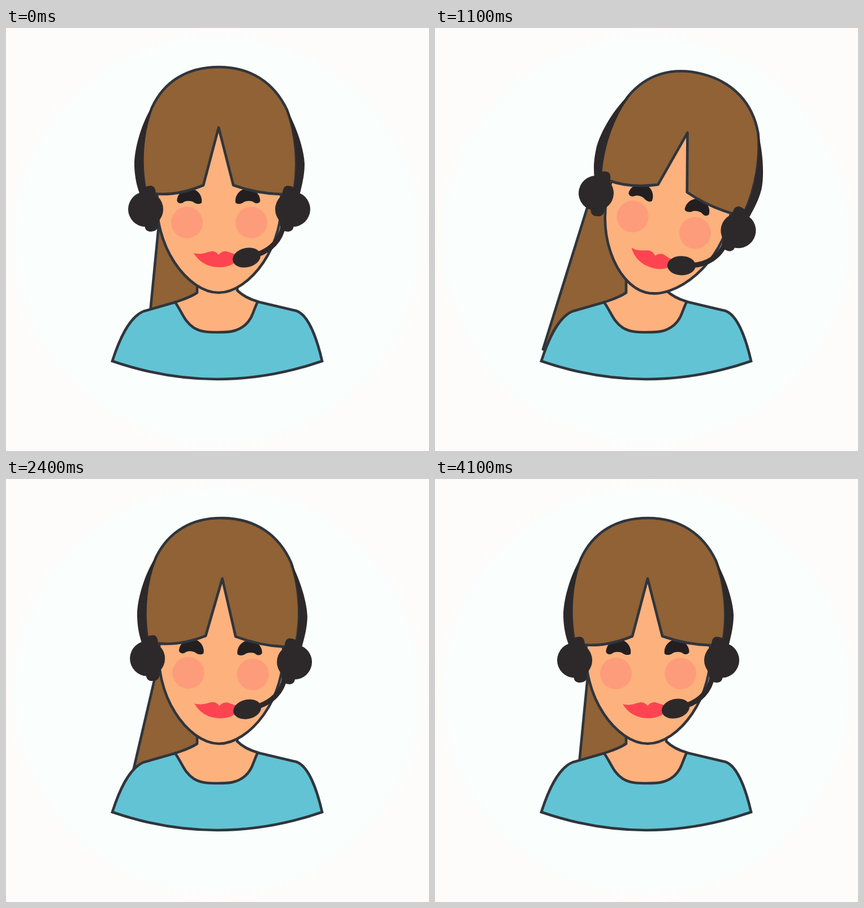
Write an HTML page that moves like this. It is 748x748 px and loops after 8 s.

```html
<!DOCTYPE html>
<html lang="en">
<head>
<meta charset="utf-8">
<title>Support agent</title>
<style>
html, body { margin: 0; width: 100%; height: 100%; overflow: hidden; background: #fefcfa; }
svg { display: block; width: 100%; height: 100%; }
.line { stroke: #30353c; stroke-width: 4.6; stroke-linejoin: round; }
.hair { fill: #906235; }
.skin { fill: #fdb17d; }
.shirt { fill: #62c3d4; stroke-linejoin: miter; }
.cheek { fill: #fd9c7a; }
.lips { fill: #fe4450; }
.brow { fill: #231f20; }
.gear { fill: #2d292a; }
.boom { fill: none; stroke: #2d292a; stroke-width: 9; }
</style>
</head>
<body>
<svg viewBox="0 0 748 748">
  <defs>
    <radialGradient id="glow">
      <stop offset=".93" stop-color="#fafefd"/>
      <stop offset="1" stop-color="#fefcfa"/>
    </radialGradient>
    <path id="brow" class="brow" d="M302.5 306C302 295 312 284 326 284C340 285 348 298 346 309C343 312 337 311.500 333 309C329 305.500 319 304.500 314 308C310 311.500 304 310 302.500 306Z"/>
    <g id="cup" class="gear">
      <circle cx="247" cy="320.5" r="31"/>
      <path d="M240 290C242 281 250 279 257 279C263 280 265 286 265 294C269 315 270 335 269 350C268 358 262 360 254 360C246 359 245 352 245 346Z"/>
    </g>
  </defs>
  <circle cx="374" cy="374" r="376" fill="url(#glow)"/>
  <path id="tail" class="hair line" d="M275.8 290L245.500 600.700H390L400 330Z"/>
  <path class="skin line" d="M338 430V468C325 477 310 481 299 485L330 560H420L446 484C432 480 419 474 409 464V430Z"/>
  <path class="shirt line" d="M188 589C200 552 217 512 243 501L299 485C312 503 315 519 332 530C345 538 360 538 374 538C392 538 408 538 423 525C436 513 436 503 445 484L513 500C535 507 550 550 559 589Q374 653 188 589Z"/>
  <g id="head">
    <path class="skin line" d="M268 290C258 385 322 468 376 468C430 468 496 385 486 290L376 172Z"/>
    <circle class="cheek" cx="320" cy="344" r="28"/>
    <circle class="cheek" cx="434" cy="344" r="28"/>
    <use href="#brow"/>
    <use href="#brow" transform="matrix(-1 0 0 1 752 0)"/>
    <path class="lips" d="M332 398C345 402 355 396 363 395C369 394 373 398 376 401C379 398 383 394 390 395C398 397 404 402 420 399C408 416 395 423 377 423C355 423 340 412 332 398Z"/>
    <path class="hair line" d="M376 176L349 278C320 290 290 296 262 293L247 290C236 235 242 180 258 141C279 95 320 69 376 69C432 69 474 96 497 145C512 185 518 240 509 288L487 294C455 293 430 288 402 278Z"/>
    <path class="gear" d="M261 135C240 165 226 215 227 245C228 265 231 278 236 292L248 292C240 250 240 190 261 135Z"/>
    <path class="gear" d="M496 143C514 175 527 215 528 240C528 260 524 275 520 292L508 292C518 240 512 190 496 143Z"/>
    <path class="boom" d="M490 350C486 375 468 392 446 400"/>
    <use href="#cup"/>
    <use href="#cup" transform="matrix(-1 0 0 1 754 0)"/>
    <ellipse class="gear" cx="425.5" cy="406" rx="25" ry="17" transform="rotate(-14 425.5 406)"/>
  </g>
</svg>
<script>
const LOOP = 8000, STEP = 100;
const head = document.getElementById('head');
const tail = document.getElementById('tail');

// cubic-bezier(.42, 0, .58, 1), solved by bisection
function easeInOut(x) {
  let lo = 0, hi = 1, u = x;
  for (let i = 0; i < 24; i++) {
    u = (lo + hi) / 2;
    const bx = 1.26 * u * (1 - u) ** 2 + 1.74 * u * u * (1 - u) + u ** 3;
    if (bx < x) lo = u; else hi = u;
  }
  return u * u * (3 - 2 * u);
}

const swing = x => 0.75 * x * x * (3 - 2 * x) + 0.25 * x;

// Keys: [time, degrees, easing towards this key]
const headKeys = [[0, 0], [1000, 15], [2000, 2], [3000, 0]];
const tailKeys = [[0, 0], [1650, 16.3, swing], [2950, 2.4], [3300, 2.4], [4100, 0]];

function angleAt(keys, t) {
  for (let i = 1; i < keys.length; i++) {
    const [t0, a0] = keys[i - 1];
    const [t1, a1, ease = easeInOut] = keys[i];
    if (t < t1) return a0 + (a1 - a0) * ease((t - t0) / (t1 - t0));
  }
  return keys[keys.length - 1][1];
}

function rotate(el, angle, x, y) {
  el.setAttribute('transform', `rotate(${angle.toFixed(3)} ${x} ${y})`);
}

function draw(ms) {
  const t = Math.floor((ms % LOOP) / STEP) * STEP;
  rotate(head, angleAt(headKeys, t), 376, 453);
  rotate(tail, angleAt(tailKeys, t), 376, 320);
}

const start = performance.now();
function tick() {
  draw(performance.now() - start);
  requestAnimationFrame(tick);
}
tick();
</script>
</body>
</html>
```
